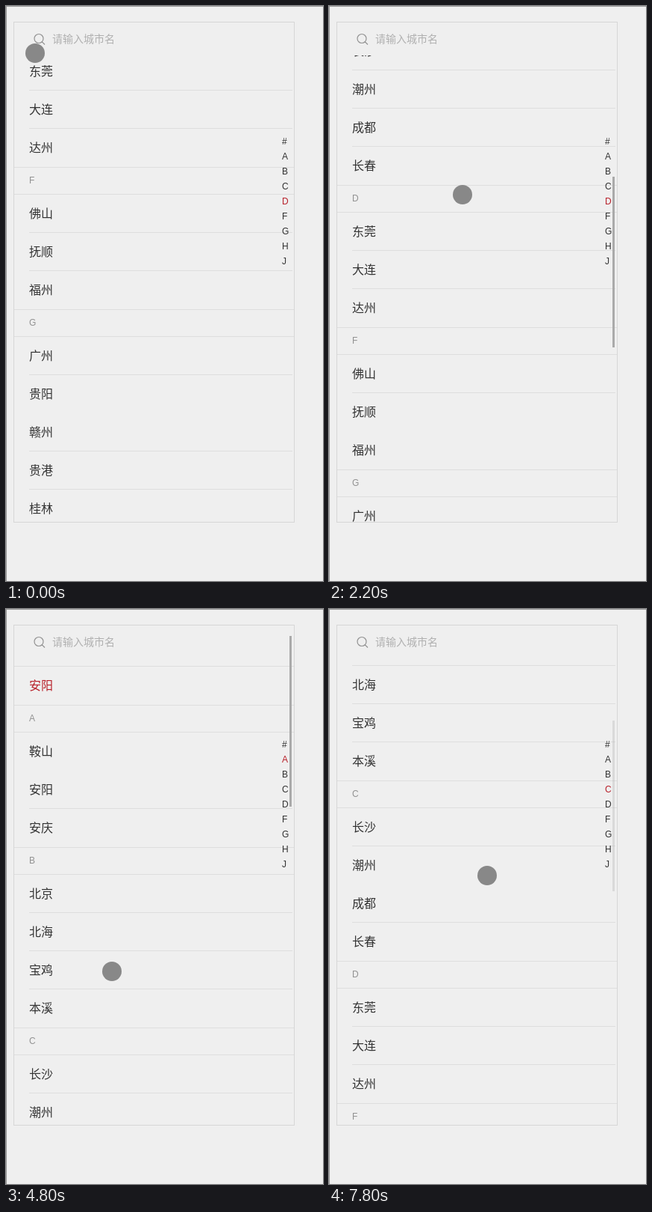
Recreate the animation shown at these times as an HTML page with a canvas. Size 425 px wide and 768 px high, loop 8 s.

```html
<!DOCTYPE html>
<html lang="zh-CN">
<head>
<meta charset="utf-8">
<title>城市列表</title>
<style>
  html, body { margin: 0; width: 100%; height: 100%; overflow: hidden; background: #efefef; }
  canvas { display: block; }
</style>
</head>
<body>
<canvas id="stage" width="425" height="768"></canvas>
<script>
const ctx = document.getElementById('stage').getContext('2d');
const LOOP = 8000, STEP = 200, FADE = 600;
const HEADER = 36, ROW = 51, LIST_TOP = 73, FIRST_SCROLL = 808;
const PAPER = '#efefef', LINE = '#dedede', INK = '#333', PALE = '#929292', RED = '#b8202a';
const CJK = '"Noto Sans CJK SC", "Noto Sans CJK", sans-serif';
const LATIN = '"Liberation Sans", "Noto Sans CJK SC", sans-serif';

const groups = [
  '# 深圳',
  'A 鞍山 安阳 安庆',
  'B 北京 北海 宝鸡 本溪',
  'C 长沙 潮州 成都 长春',
  'D 东莞 大连 达州',
  'F 佛山 抚顺 福州',
  'G 广州 贵阳 赣州 贵港 桂林',
  'H 惠州 杭州 呼和浩特 海口',
  'J 济南 嘉兴 江门 吉林'
].map(line => {
  const [letter, ...cities] = line.split(' ');
  return { letter, cities, height: HEADER + cities.length * ROW + 1 };
});
groups.reduce((top, group) => (group.top = top) + group.height, 0);

// The pointer's story: every drag carries the list along with it.
const gestures = [], taps = [];
let pen = { time: 0, x: 39, y: 63 };

function glide(duration, x, y, held = false) {
  const to = { time: pen.time + duration, x, y };
  gestures.push({ from: pen, to, held });
  pen = to;
}
const drag = (duration, x, y) => glide(duration, x, y, true);
const wait = duration => glide(duration, pen.x, pen.y);
const tap = city => taps.push({ time: pen.time, city });

glide(800, 170, 666);
drag(600, 176, 492);
drag(400, 178, 732);
glide(200, 177, 104);
drag(600, 183, 548);
glide(200, 195, 150);
drag(400, 200, 448);
glide(400, 210, 391);
glide(600, 50, 274);
tap('安阳');
glide(400, 142, 517);
drag(200, 142, 484);
wait(600);
tap('宝鸡');
glide(400, 150, 540);
glide(200, 158, 316);
drag(400, 163, 349);
glide(400, 190, 676);
drag(600, 208, 313);
glide(400, 212, 356);
wait(LOOP - pen.time);

const clamp = value => Math.min(1, Math.max(0, value));
const smooth = part => part * part * (3 - 2 * part);
const mix = (a, b, part) => a + (b - a) * part;

function poseAt(time) {
  const pose = { scroll: FIRST_SCROLL, bar: 0, city: groups[0].cities[0], tapped: false };
  for (const { from, to, held } of gestures) {
    if (from.time > time) break;
    const part = clamp((time - from.time) / (to.time - from.time));
    const eased = held ? part : smooth(part);
    pose.x = mix(from.x, to.x, eased);
    pose.y = mix(from.y, to.y, eased);
    if (held) {
      pose.scroll -= pose.y - from.y;
      pose.bar = clamp(1 - (time - to.time) / FADE);
    }
  }
  for (const { time: when, city } of taps) {
    if (when <= time) Object.assign(pose, { city, tapped: true });
  }
  pose.scroll = Math.max(0, Math.round(pose.scroll));
  return pose;
}

function rect(x, y, w, h, color) {
  ctx.fillStyle = color;
  ctx.fillRect(x, y, w, h);
}

function disc(x, y, radius, color) {
  ctx.fillStyle = color;
  ctx.beginPath();
  ctx.arc(x, y, radius, 0, Math.PI * 2);
  ctx.fill();
}

function text(string, x, baseline, size, color, family) {
  ctx.font = `${size}px ${family}`;
  ctx.fillStyle = color;
  ctx.fillText(string, x, baseline);
}

function drawGroup(title, cities, top, color) {
  const first = top + HEADER;
  text(title, 31, top + 22, 12, PALE, LATIN);
  rect(11, first, 375, 1, LINE);
  cities.forEach((city, i) => {
    const y = first + i * ROW;
    // Hairlines vanish on every eighth pixel row.
    if (i && y % 8 !== 7) rect(31, y, 353, 1, LINE);
    text(city, 31, y + 32, 16, color, CJK);
  });
  rect(11, first + cities.length * ROW + 1, 375, 1, LINE);
}

function drawList({ scroll, city, tapped }) {
  ctx.save();
  ctx.beginPath();
  ctx.rect(11, 66, 375, 623);
  ctx.clip();
  groups.forEach(({ letter, cities, top }, i) => {
    const y = LIST_TOP + top - scroll;
    if (i) drawGroup(letter, cities, y, INK);
    else drawGroup('当前城市', [city], y, tapped ? RED : INK);
  });
  ctx.restore();
}

function drawSearch() {
  ctx.strokeStyle = '#929292';
  ctx.lineWidth = 1.2;
  ctx.beginPath();
  ctx.arc(44, 43.5, 6, 0, Math.PI * 2);
  ctx.moveTo(48.3, 47.8);
  ctx.lineTo(52, 51.5);
  ctx.stroke();
  text('请输入城市名', 62, 49, 14, '#b0b0b0', CJK);
}

function drawScrollbar({ scroll, bar }) {
  ctx.globalAlpha = bar;
  rect(380, Math.round(25 + scroll * .342), 3, 228, '#aaa');
  ctx.globalAlpha = 1;
}

function drawIndex({ scroll }) {
  const probe = scroll * .87 + 245;
  const active = groups.findLast(group => group.top <= probe);
  groups.forEach((group, i) =>
    text(group.letter, 370, 185 + i * 20, 12, group === active ? RED : INK, LATIN));
}

function draw(time) {
  const pose = poseAt(time);
  rect(0, 0, 425, 768, PAPER);
  rect(0, 0, 425, 1, '#999');
  rect(0, 0, 1, 768, '#999');
  drawList(pose);
  ctx.strokeStyle = '#d6d6d6';
  ctx.lineWidth = 1;
  ctx.strokeRect(10.5, 21.5, 376, 668);
  drawSearch();
  drawScrollbar(pose);
  drawIndex(pose);
  disc(pose.x, pose.y, 13, '#888');
}

const start = performance.now();
function frame() {
  const time = (performance.now() - start) % LOOP;
  draw(Math.floor(time / STEP) * STEP);
  requestAnimationFrame(frame);
}
frame();
</script>
</body>
</html>
```
